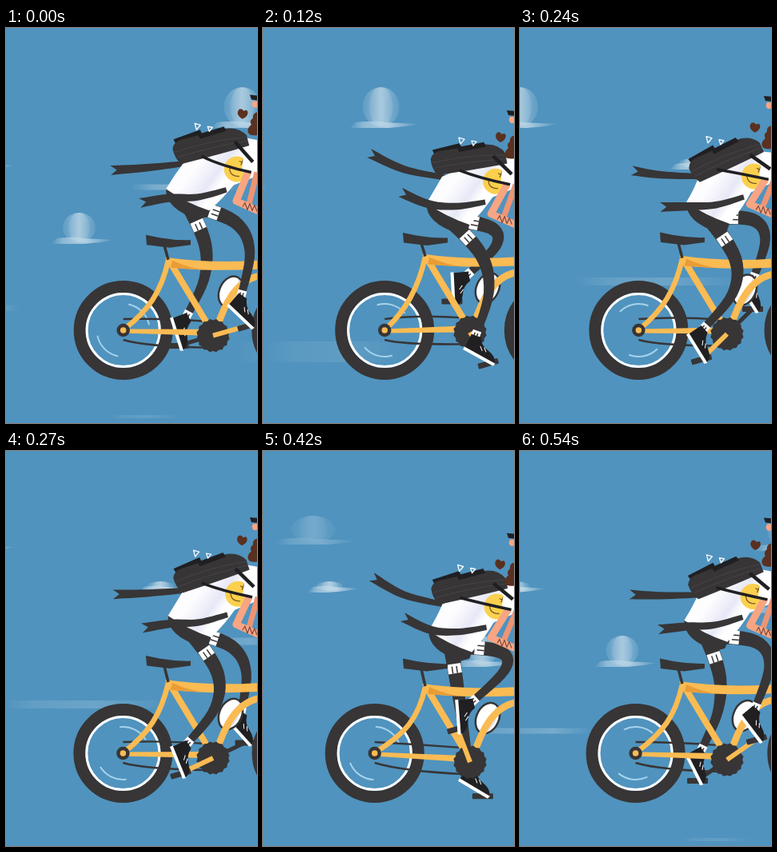
An HTML page for the animation above (0.57 s loop, 314 px wide and 494 px high).

```html
<!DOCTYPE html>
<html lang="en">
<head>
<meta charset="utf-8">
<title>Cyclist</title>
<style>
html, body { margin: 0; width: 100%; height: 100%; overflow: hidden; background: #5093be; }
svg { display: block; width: 314px; height: 494px; }
</style>
</head>
<body>
<svg viewBox="0 0 314 494" xmlns="http://www.w3.org/2000/svg">
  <defs>
    <linearGradient id="mist">
      <stop offset="0" stop-color="#fff" stop-opacity="0"/>
      <stop offset=".2" stop-color="#fff" stop-opacity=".6"/>
      <stop offset=".55" stop-color="#fff" stop-opacity=".9"/>
      <stop offset="1" stop-color="#fff" stop-opacity="0"/>
    </linearGradient>
    <linearGradient id="puff">
      <stop offset="0" stop-color="#fff" stop-opacity=".15"/>
      <stop offset=".5" stop-color="#fff" stop-opacity=".6"/>
      <stop offset="1" stop-color="#fff" stop-opacity=".15"/>
    </linearGradient>
    <linearGradient id="cloth" x1="0" y1="0" x2="1" y2=".6">
      <stop offset="0" stop-color="#fff"/>
      <stop offset=".42" stop-color="#fdfdff"/>
      <stop offset=".62" stop-color="#e7e8f6"/>
      <stop offset=".72" stop-color="#fff"/>
    </linearGradient>
  </defs>
  <rect width="314" height="494" fill="#5093be"/>
  <g id="scene"></g>
</svg>
<script>
const LOOP = 570, STEP = 30, N = LOOP / STEP;
const DARK = '#373536', INK = '#201f22', GOLD = '#fabb53', SKIN = '#f7a583', BROWN = '#5a3020';
const scene = document.getElementById('scene');
const mod = (a, n) => ((a % n) + n) % n;
const cos = d => Math.cos(d * Math.PI / 180), sin = d => Math.sin(d * Math.PI / 180);
const f = n => n.toFixed(1);
const pt = p => f(p[0]) + ',' + f(p[1]);
const add = (p, x, y) => [p[0] + x, p[1] + y];
const mix = (p, q, u) => [p[0] + (q[0] - p[0]) * u, p[1] + (q[1] - p[1]) * u];
const polar = (p, r, deg) => add(p, r * cos(deg), r * sin(deg));
const shape = (d, fill, more = '') => `<path d="${d}" fill="${fill}" ${more}/>`;
const line = (d, col, w, more = '') =>
  `<path d="${d}" fill="none" stroke="${col}" stroke-width="${w}" stroke-linejoin="round" ${more}/>`;
const at = (p, deg, body) => `<g transform="translate(${pt(p)}) rotate(${f(deg)})">${body}</g>`;

// The bike sways once per loop; the rider bobs twice.
function pose(s) {
  const a = 360 * s / N;
  const sway = (mid, amp, lag) => mid + amp * cos(a - lag);
  const bob = (mid, amp, lag) => mid + amp * cos(2 * a - lag);
  return {
    crank: 164 + a,
    spin: 2 * a - 45,
    wheelX: sway(146, 6.3, 84),
    frameY: sway(.7, 4.4, 270),
    seatY: sway(-.4, 2.4, 300),
    hem: [bob(204.3, 8.5, 240), bob(214, 18, 225)],
    bag: [bob(257.5, 1.5, 225), bob(159, 18, 225)],
    bagTilt: bob(-10, 12, 90),
    tag: [bob(242.5, 6.5, 120), bob(136, 18, 225)],
    smile: [bob(291, 4.5, 240), bob(186, 11, 210)],
    elbow: [bob(286.5, 1.5, 0), bob(225, 8.5, 180)],
    heart: [bob(296.5, 2.5, 90), bob(125, 21, 210)],
    hatY: bob(97, 10, 160),
    tipA: [bob(134, 9.5, 250), bob(168, 11.5, -30)],
    midA: [176, bob(178, 9.5, 250)],
    tipB: [bob(171.5, 8.5, 240), bob(214, 10, 300)],
    midB: [bob(207, 7, 240), bob(219, 11, 235)]
  };
}

// Samples a smooth line through pts: position, normal and angle.
function trace(pts, per = 7) {
  const out = [], n = pts.length - 1;
  const P = i => pts[Math.max(0, Math.min(n, i))];
  for (let k = 0; k <= n * per; k++) {
    const i = Math.min(n - 1, Math.floor(k / per)), u = k / per - i;
    const [x, y] = [0, 1].map(a => {
      const [p, q, r, s] = [P(i - 1)[a], P(i)[a], P(i + 1)[a], P(i + 2)[a]];
      const b = 2 * p - 5 * q + 4 * r - s, d = 3 * q - p - 3 * r + s;
      return [q + ((r - p) * u + b * u * u + d * u ** 3) / 2, r - p + 2 * b * u + 3 * d * u * u];
    });
    const len = Math.hypot(x[1], y[1]) || 1;
    out.push({ p: [x[0], y[0]], n: [-y[1] / len, x[1] / len], a: Math.atan2(y[1], x[1]) * 180 / Math.PI });
  }
  return out;
}

function strip(tr, w0, w1, mouth = '') {
  const side = g => tr.map((q, i) => {
    const w = g * (w0 + (w1 - w0) * i / (tr.length - 1)) / 2;
    return pt(add(q.p, q.n[0] * w, q.n[1] * w));
  });
  return 'M' + side(1).concat(side(-1).reverse()).join('L') + mouth + 'Z';
}

function ribbon(...pts) {
  const tr = trace(pts);
  return shape(strip(tr, 12, 6.5, 'L' + pt(polar(tr[0].p, 8, tr[0].a))), DARK);
}

const band = (p, deg, w, l) => at(p, deg,
  `<rect x="${-l / 2}" y="${-w / 2}" width="${l}" height="${w}" fill="#fff"/>` +
  line(`M${-l / 2 + 3},${-w / 6}H${l / 2}M${-l / 2 + 3},${w / 6}H${l / 2}`, DARK, 1.5));

// Foot tilt follows the crank; two equal bones place the knee in front.
function leg(hip, pedal, crank, bone) {
  const deg = 58 - 30 * cos(crank - 45);
  const ankle = add(pedal, 19 * sin(deg) - 30 * cos(deg), -30 * sin(deg) - 19 * cos(deg));
  const dx = ankle[0] - hip[0], dy = ankle[1] - hip[1], len = Math.hypot(dx, dy);
  const bend = Math.sqrt(Math.max(0, bone * bone - len * len / 4)) / len;
  const knee = add(mix(hip, ankle, .5), dy * bend, -dx * bend);
  const tr = trace([hip, mix(hip, knee, .7), mix(ankle, knee, .68), ankle]);
  const cuff = tr[4], sock = tr[tr.length - 2];
  return shape(strip(tr, 20, 9), DARK) + band(cuff.p, cuff.a, 17, 12) + band(sock.p, sock.a, 11, 9) +
    at(ankle, deg, shape('M-6,-3L6,-5Q12,4 22,5Q35,7 37,15V17H-5Z', INK) +
      shape('M-6,15H38L37,19H-6Z', '#fff') + line('M11,5L16,9M16,4L21,8', '#fff', 1));
}

const pedalBar = (p, deg) => at(p, deg, `<rect x="-13" y="-3" width="26" height="7" rx="1" fill="${DARK}"/>`);

const passX = (s, s0, x0, speed) => x0 - speed * (mod(s - s0 + N / 2, N) - N / 2);

function cloud(x, y, w, h, o) {
  const r = w / 4, dome = k =>
    `<ellipse cx="${f(x - w * .07)}" cy="${f(y - h * .5)}" rx="${f(r * k)}" ry="${f(h * .5)}" fill="url(#puff)"/>`;
  return `<g opacity="${o}">` + dome(1) + dome(.65) +
    shape(`M${f(x - w / 2)},${y + 2}l8,-7q${f(w / 3)},-3 ${f(w * .38)},0l${f(w / 2)},2q-20,4 -40,5Z`, 'url(#mist)') + '</g>';
}

const streak = (x, y, w, h, o) =>
  `<rect x="${f(x - w / 2)}" y="${y - h / 2}" width="${w}" height="${h}" rx="${h / 2}" fill="url(#mist)" opacity="${o}"/>`;

function sky(s) {
  const gust = (s0, x0) => passX(s, s0, x0, 72);
  return cloud(passX(s, 3, 191, 37), 123, 92, 49, .6) + cloud(passX(s, 17, 170, 36.4), 268, 82, 37, .6) +
    cloud(passX(s, 14, 88, 22), 175, 66, 12, .65) + cloud(passX(s, 12.5, 162, 61), 115, 110, 34, .25) +
    streak(gust(2, 82), 199, 138, 7, .38) + streak(gust(11, 155), 238, 130, 9, .22) +
    streak(gust(9, 100), 317, 210, 10, .18) + streak(gust(18, 35), 350, 110, 7, .25) +
    streak(gust(2, 235), 405, 180, 26, .1) + streak(gust(2, 30), 486, 90, 4, .12);
}

function wheel(x, spin) {
  const arc = a => line(`M${pt(polar([0, 0], 33, a - 32))}A33,33 0 0 1 ${pt(polar([0, 0], 33, a + 32))}`,
    '#a5d3ec', 2, 'stroke-linecap="round"');
  return at([x, 378], 0, `<circle r="54.5" fill="none" stroke="${DARK}" stroke-width="15"/>` +
    '<circle r="45.6" fill="none" stroke="#fff" stroke-width="3"/>' + arc(spin) + arc(spin + 180));
}

function frame(x, y) {
  const Y = n => f(n + y);
  return shape(`M${f(x)},376.5L250,${Y(376)}V${Y(384)}L${f(x)},381.5Z`, GOLD) +
    line(`M203,${Y(290)}C194,${Y(330)} 178,353 ${f(x + 2)},376`, GOLD, 6.5) +
    line(`M204,${Y(290)}L256,${Y(376)}`, GOLD, 8) +
    at([281, 329 + y], 24, `<ellipse rx="14" ry="20" fill="#fff" stroke="${DARK}" stroke-width="2.5"/>` +
      line('M5,-17Q12,0 4,17', '#dfe2ee', 4)) +
    line(`M263,${Y(377)}C273,${Y(345)} 288,${Y(314)} 318,${Y(309)}`, GOLD, 8.5) +
    shape(`M199,${Y(286)}Q255,${Y(294)} 316,${Y(290)}V${Y(301)}Q255,${Y(304)} 206,${Y(299)}Z`, GOLD) +
    shape(`M208,${Y(290)}Q230,${Y(300)} 250,${Y(302)}L206,${Y(299)}Z`, '#e99c35');
}

const chain = (x, y) => line(`M${f(x)},364Q195,${f(362 + y)} 250,${f(366 + y)}` +
  `M${f(x)},390Q175,${f(398 + y / 2)} 252,${f(399 + y)}`, DARK, 2.4);

function ring(p) {
  const teeth = Array.from({ length: 32 }, (_, i) => pt(polar(p, i % 2 ? 21 : 19.3, i * 11.25)));
  return shape('M' + teeth.join('L') + 'Z', DARK);
}

const seat = (top, tube) => line(`M198,${f(271 + top)}L203,${f(289 + tube)}`, DARK, 3.5) +
  at([0, top], 0, shape('M175,258L192,261.5Q212,265 231,264.5V270.5L205,274L176,270.5Z', DARK));

function backpack({ bag, bagTilt, smile, tag }) {
  return at(bag, bagTilt,
    shape('M-45,-15L-10,-21L-8,-12L-42,-6Z', INK) +
    shape('M-48,-4Q-45,-12 -36,-13L20,-17Q38,-17 46,-4L47,9Q15,13 -41,17Q-48,8 -48,-4Z', DARK) +
    shape('M-14,-16L20,-20L22,-14L-12,-10Z', INK) +
    line('M-46,1Q0,-6 45,-2M-44,8Q0,2 46,3', '#464347', 1)) +
    line(`M${pt(add(bag, -12, 14))}Q${pt(add(smile, -20, -4))} ${pt(add(smile, 18, 4))}`, INK, 3.5) +
    line(`M${pt(add(bag, 30, -4))}L${pt(add(smile, 20, -9))}`, INK, 4.5) +
    line(`M${pt(add(tag, -3, -4))}l7,2l-5,6ZM${pt(add(tag, 13, 0))}l6,1l-4,5Z`, '#f4f7fa', 1.4);
}

function shirt({ hem, bag, smile }, hemR) {
  const side = add(smile, -4, 20);
  return shape(`M${pt(hem)}Q${pt(add(hem, 11, -18))} ${pt(add(bag, -34, 22))}L${pt(add(bag, 38, -10))}` +
    `L316,${f(bag[1] - 6)}V${f(smile[1] + 8)}L${pt(side)}Q${pt(add(mix(side, hemR, .5), 3, 0))} ${pt(hemR)}` +
    `Q${pt(add(hem, 24, 17))} ${pt(hem)}Z`, 'url(#cloth)') +
    `<circle cx="${f(smile[0])}" cy="${f(smile[1])}" r="16" fill="#fbd04e"/>` +
    line(`M${pt(add(smile, 3, -10))}l7,3m-5,2l3,-7M${pt(add(smile, -9, -1))}q0,10 12,10`, '#7d5b24', 1.3) +
    shape(`M${pt(add(smile, 10, -30))}H318V${f(smile[1] + 10)}L${pt(add(smile, 6, 3))}Z`, '#fff');
}

function arms({ smile, elbow }) {
  const cuff = add(smile, 14, 4);
  return line(`M${pt(add(cuff, 11, 0))}L${pt(add(elbow, 16, 4))}`, '#ee9474', 7) +
    line(`M${pt(cuff)}L${pt(elbow)}l34,15`, SKIN, 9) +
    line(`M${pt(add(elbow, 8, 7))}l3,-5l3,9l3,-8l3,9l3,-7l3,8`, '#75443a', 1.1);
}

function head({ heart: [x, y], hatY }) {
  return shape(`M${f(x - 1)},${f(y + 7)}q-9,-6 -4,-12q4,-2 6,2q5,-3 5,3q-1,5 -7,7Z`, BROWN) +
    shape(`M316,${f(y - 2)}q-8,1 -7,8q-5,3 -2,8q-6,5 -4,10q2,5 13,3Z`, BROWN) +
    shape(`M316,${f(hatY + 4)}h-7q-3,5 1,8h6Z`, SKIN) +
    shape(`M305,${f(hatY - 4)}l11,1v6l-9,-1Z`, INK);
}

function draw(s) {
  const b = pose(s), { hem, wheelX, frameY, crank, spin } = b;
  const hub = [259, 384 + frameY], hip = add(hem, 28, 19), hemR = add(hem, 54, 27);
  const far = polar(hub, 45, crank), near = polar(hub, 45, crank + 180);
  const hips = shape(`M${pt(hem)}Q${pt(add(hem, -1, 25))} ${pt(add(hem, 40, 38))}L${pt(add(hemR, -3, 8))}L${pt(hemR)}Z`, DARK);
  const endB = add(b.smile, -13, 26);

  scene.innerHTML = sky(s) + wheel(516 - wheelX, -spin) + wheel(wheelX, spin) + chain(wheelX, frameY) +
    line(`M${pt(hub)}L${pt(far)}`, DARK, 5) + pedalBar(far, 0) + leg(hip, far, crank, 78) +
    frame(wheelX, frameY) +
    `<circle cx="${f(wheelX)}" cy="378" r="6" fill="${GOLD}" stroke="${DARK}" stroke-width="4.5"/>` +
    seat(b.seatY, frameY) + ring(hub) + line(`M${pt(hub)}L${pt(near)}`, GOLD, 6) + pedalBar(near, -16) +
    hips + leg(hip, near, crank + 180, 88) +
    ribbon(b.tipA, b.midA, add(b.bag, -30, 23)) + shirt(b, hemR) +
    ribbon(b.tipB, b.midB, add(mix(b.midB, endB, .5), 0, 4), endB) +
    arms(b) + backpack(b) + head(b);
}

let last = -1;
const start = performance.now();
function tick() {
  const s = Math.floor((performance.now() - start) % LOOP / STEP);
  if (s !== last) draw(last = s);
  requestAnimationFrame(tick);
}
tick();
</script>
</body>
</html>
```
